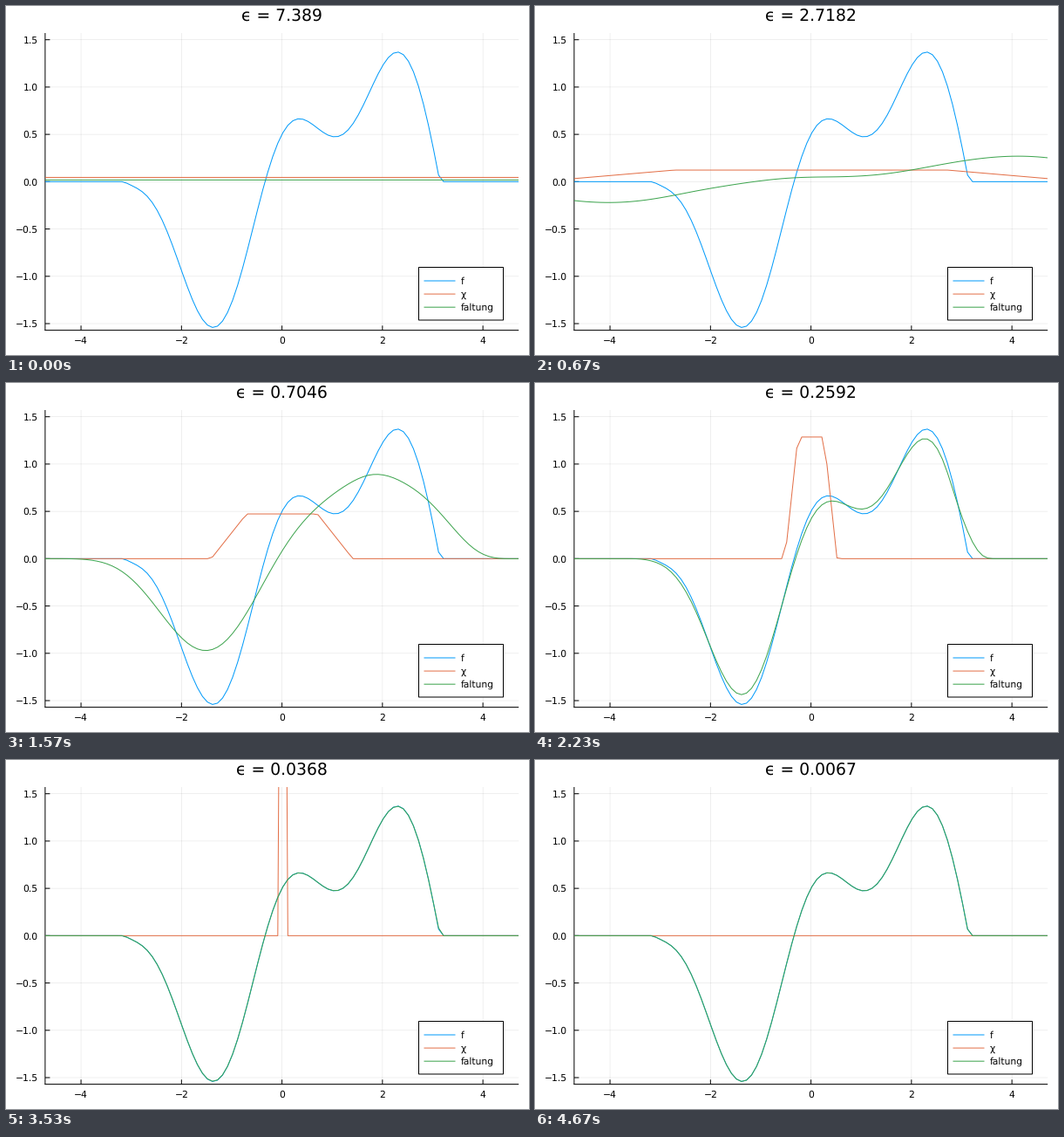
Animation, 600 px wide and 400 px high, one loop 4.71 s. Source, as a matplotlib script:

```python
import math

import matplotlib.pyplot as plt
import numpy as np
from matplotlib.animation import FuncAnimation
from matplotlib.patches import Rectangle

plt.rcParams.update({"font.family": "DejaVu Sans", "text.hinting": "none"})

WIDTH, HEIGHT, DPI = 600, 400, 100
PX = 72 / DPI  # one pixel in points
LEFT, RIGHT, TOP, BOTTOM = 45, 588.2, 31, 371.7
BLUE, ORANGE, GREEN = "#009afa", "#e36f47", "#3da44e"
STEPS, TICK_MS, LOOP_MS = 140, 10, 4710


def to_x(x):
    return (LEFT + RIGHT) / 2 + x * (RIGHT - LEFT) / (3 * math.pi)


def to_y(y):
    return (TOP + BOTTOM) / 2 - y * (BOTTOM - TOP) / math.pi


def f(x):
    wave = x * np.cos(x / 2) + 0.5 * np.cos(2.5 * x)
    return np.where(np.abs(x) < math.pi, wave, 0)


def chi(u):
    return np.clip(2 - np.abs(u), 0, 1) / 3


xs = np.arange(-2 * math.pi, 2 * math.pi, 0.1)
us = np.linspace(-2, 2, 401)
weights = chi(us) * (us[1] - us[0])


def convolve(eps):
    return f(xs[:, None] - eps * us) @ weights


fig = plt.figure(figsize=(WIDTH / DPI, HEIGHT / DPI), dpi=DPI, facecolor="white")
ax = fig.add_axes([0, 0, 1, 1])
ax.set_xlim(0, WIDTH)
ax.set_ylim(HEIGHT, 0)
ax.axis("off")


def line(x, y, color="black", width=1, **kw):
    return ax.plot(x, y, color=color, lw=width * PX, snap=False,
                   solid_capstyle="butt", **kw)[0]


def label(x, y, text, size=10.8, ha="left"):
    return ax.text(x, y, text, size=size * PX, ha=ha, va="baseline", zorder=6)


def number(value, digits):
    return f"{value:.{digits}f}".replace("-", "\u2212")


# Grid, ticks and tick labels
grid = dict(color="black", width=0.6, alpha=0.1, zorder=1)
for v in range(-4, 5, 2):
    x = to_x(v)
    line([x, x], [TOP, BOTTOM], **grid)
    line([x, x], [BOTTOM, BOTTOM - 5.4], zorder=2)
    label(x, 387, number(v, 0), ha="center")
for v in np.arange(-1.5, 1.6, 0.5):
    y = to_y(v)
    line([LEFT, RIGHT], [y, y], **grid)
    line([LEFT, LEFT + 5.4], [y, y], zorder=2)
    label(36.5, y + 4, number(v, 1), ha="right")
line([LEFT - 0.1] * 2, [TOP, BOTTOM + 0.3], zorder=2)
line([LEFT - 0.5, RIGHT], [BOTTOM - 0.1] * 2, zorder=2)

# Curves
area = Rectangle((LEFT, TOP), RIGHT - LEFT, BOTTOM - TOP, transform=ax.transData)


def curve(color):
    artist = line(to_x(xs), to_y(f(xs)), color, zorder=3)
    artist.set_clip_path(area)
    return artist


curve(BLUE)
chi_line = curve(ORANGE)
conv_line = curve(GREEN)

# Legend
ax.add_patch(Rectangle((473.5, 299.5), 97, 60.5, facecolor="white",
                       edgecolor="black", lw=PX, snap=False, zorder=4))
for i, (name, color) in enumerate([("f", BLUE), ("χ", ORANGE), ("faltung", GREEN)]):
    y = 315 + 15.1 * i
    line([479.5, 515.5], [y, y], color, zorder=5)
    label(521.5, y + 4, name)

title = label((LEFT + RIGHT) / 2, 17, "", size=18.8, ha="center")


def update(tick):
    # Thirty steps a second, rounded to ten milliseconds
    step = min((3 * tick + 1) // 10, STEPS)
    eps = math.exp(2 - step / 20)
    chi_line.set_ydata(to_y(chi(xs / eps) / eps))
    conv_line.set_ydata(to_y(convolve(eps)))
    title.set_text(f"ϵ = {math.floor(eps * 1e4) / 1e4}")
    return chi_line, conv_line, title


anim = FuncAnimation(fig, update, frames=LOOP_MS // TICK_MS, interval=TICK_MS,
                     repeat=True, repeat_delay=0)
plt.show()
```
